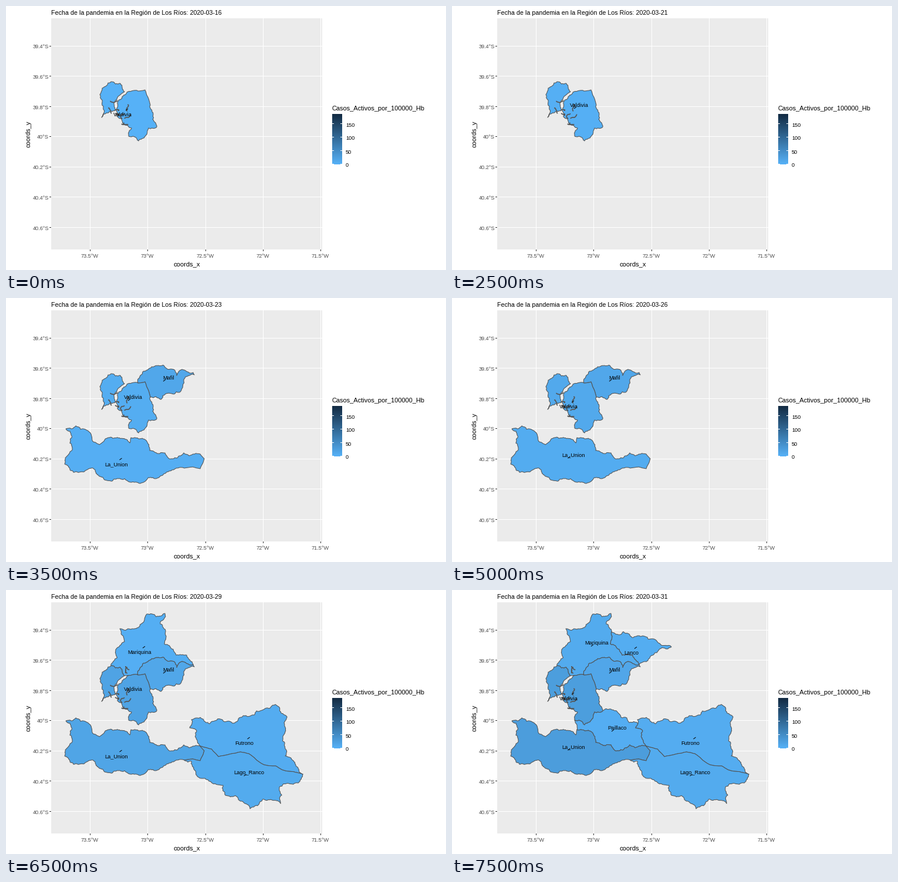
Write a matplotlib script that moves like this. It is 750 by 450 pixels and loops after 8000 ms.

```python
import math
import random

import matplotlib.pyplot as plt
import numpy as np
from matplotlib.animation import FuncAnimation
from matplotlib.patches import Polygon, Rectangle

W, H, DPI = 750, 450, 100
PT = 72 / DPI
DAYS, STEP = 16, 500
LOW, HIGH = np.array([86, 177, 247]) / 255, np.array([19, 43, 67]) / 255
PANEL, LINE, MAXV = "#EBEBEB", "#505050", 190

plt.rcParams["font.family"] = "Liberation Sans"
fig = plt.figure(figsize=(W / DPI, H / DPI), dpi=DPI, facecolor="white")
ax = fig.add_axes([0, 0, 1, 1])
ax.axis("off")


def text(x, y, s, size, color="black", ha="left", va="baseline", **kw):
    return ax.text(x, y, s, fontsize=size * PT, color=color, ha=ha, va=va, **kw)


def stroke(xs, ys, color, width=1, **kw):
    return ax.plot(xs, ys, color=color, lw=width * PT, snap=False,
                   solid_capstyle="butt", **kw)[0]


def shade(value):
    return LOW + (HIGH - LOW) * value / MAXV


def split(a, b, rng, amp):
    """Midpoint displacement from a up to, but without, b."""
    dx, dy = b[0] - a[0], b[1] - a[1]
    if math.hypot(dx, dy) < 3:
        return [a]
    d = rng.uniform(-amp, amp)
    mid = ((a[0] + b[0]) / 2 - dy * d, (a[1] + b[1]) / 2 + dx * d)
    return split(a, mid, rng, amp) + split(mid, b, rng, amp)


def ring(*arcs):
    """Rough outline; a border looks the same from both of its sides."""
    out = []
    for arc in arcs:
        amp = 0.04 if arc in smooth or arc[::-1] in smooth else 0.2
        for p, q in zip(arc, arc[1:]):
            a, b = sorted((p, q))
            rng = random.Random(a[0] * 7919 + a[1] * 104729 + b[0] * 31 + b[1])
            edge = split(a, b, rng, amp) + [b]
            out += (edge if a == p else edge[::-1])[:-1]
    return out


def back(arc):
    return arc[::-1]


# Key points of each border, in pixels
west_north = [(179, 129), (195, 132), (202, 146)]
west_rest = [(202, 146), (190, 156), (186, 178), (163, 190), (166, 171),
             (160, 151), (164, 140), (171, 136), (179, 129)]
east_north = [(208, 146), (225, 145)]
val_maf = [(225, 145), (237, 143), (246, 169)]
val_east = [(246, 169), (250, 193), (257, 206)]
val_south = [(257, 206), (243, 208), (226, 230)]
val_west = [(226, 230), (209, 222), (214, 208), (190, 189), (190, 163),
            (208, 146)]
maf_north = [(225, 145), (229, 132), (252, 117), (282, 121), (291, 132),
             (297, 123), (319, 127)]
maf_south = [(319, 127), (321, 131), (303, 139), (297, 160), (273, 163),
             (264, 173), (246, 169)]
mar_coast = [(179, 129), (190, 98), (202, 88), (194, 66), (213, 67),
             (236, 51), (240, 41), (271, 40), (263, 58), (272, 71)]
mar_east = [(272, 71), (270, 92), (285, 101), (290, 111), (308, 111),
            (319, 127)]
lan_north = [(272, 71), (287, 76), (292, 71), (307, 81), (335, 84), (374, 97),
             (345, 108), (337, 116), (319, 127)]
uni_north = [(102, 223), (119, 218), (137, 225), (147, 243), (159, 250),
             (174, 238), (205, 241), (211, 247), (213, 238)]
uni_pai = [(213, 238), (238, 242), (245, 260), (271, 264), (277, 273),
           (303, 264), (312, 269), (331, 266)]
uni_east = [(331, 266), (338, 274), (331, 291)]
uni_tail = [(331, 291), (318, 288), (304, 290)]
uni_south = [(304, 290), (283, 293), (258, 307), (243, 306), (212, 314),
             (168, 310), (152, 293), (122, 297), (100, 283), (112, 260),
             (112, 235), (102, 223)]
pai_north = [(257, 206), (282, 208), (288, 217), (298, 218), (302, 226),
             (317, 228)]
fut_west = [(317, 228), (313, 235), (325, 240), (331, 266)]
fut_north = [(317, 228), (316, 221), (336, 220), (347, 228), (386, 227),
             (400, 217), (423, 213), (427, 206), (459, 195), (469, 210),
             (479, 216), (475, 262), (476, 283), (490, 291), (506, 314)]
lake = [(331, 266), (350, 271), (362, 284), (400, 276), (414, 279),
        (440, 298), (460, 300), (472, 307), (506, 314)]
ran_south = [(506, 314), (498, 329), (466, 336), (468, 364), (437, 357),
             (416, 373), (404, 361), (374, 350), (370, 333), (328, 319),
             (316, 292), (304, 290)]
smooth = [val_maf, uni_east, uni_tail, lake]

shapes = {
    "Mariquina": [ring(mar_coast, mar_east, back(maf_north), back(east_north),
                       back(west_north))],
    "Lanco": [ring(lan_north, back(mar_east))],
    "Mafil": [ring(maf_north, maf_south, back(val_maf))],
    "Valdivia": [ring(west_north, west_rest),
                 ring(east_north, val_maf, val_east, val_south, val_west)],
    "Paillaco": [ring(pai_north, fut_west, back(uni_pai),
                      [(213, 238), (209, 222), (226, 230)], back(val_south))],
    "La_Union": [ring(uni_north, uni_pai, uni_east, uni_tail, uni_south)],
    "Futrono": [ring(fut_north, back(lake), back(fut_west))],
    "Lago_Ranco": [ring(lake, ran_south, back(uni_tail), back(uni_east))],
}

# First day, cases on first and last day, label point, days with label below
towns = {
    "Mariquina": (12, 4, 9, (237, 96), (13, 14)),
    "Lanco": (14, 6, 6, (315, 97), (14, 15)),
    "Mafil": (6, 14, 15, (268, 142), (6, 8, 11)),
    "Valdivia": (0, 0, 27, (208, 175), (0, 2, 3, 10, 15)),
    "Paillaco": (14, 5, 5, (272, 241), ()),
    "La_Union": (7, 4, 28, (197.5, 273), range(7, 14, 2)),
    "Futrono": (11, 7, 7, (415.5, 251), range(12, 16)),
    "Lago_Ranco": (11, 9, 9, (405.5, 317), (14,)),
}


def creeks(seed, n, x0, x1, y0, y1):
    """Short wandering waterways that start inside a box."""
    rng = random.Random(seed)
    for _ in range(n):
        x, y = rng.uniform(x0, x1), rng.uniform(y0, y1)
        turn, path = rng.uniform(0, math.tau), [(x, y)]
        for _ in range(6):
            turn += rng.uniform(-0.9, 0.9)
            x += 2.4 * math.cos(turn)
            y += 2.4 * math.sin(turn)
            path.append((min(max(x, x0), x1), min(max(y, y0), y1)))
        yield path


waters = {"Valdivia": list(creeks(5, 4, 175, 192, 154, 186))
          + list(creeks(8, 5, 192, 214, 168, 202)),
          "Mariquina": list(creeks(3, 3, 204, 216, 119, 142))}

# Panel, grid and axes
ax.add_patch(Rectangle((77, 21), 462, 394, fc=PANEL, ec="none", zorder=0))
for i in range(5):
    x = round(143 + 98.35 * i) + 0.5
    stroke([x, x], [21, 415], "white", zorder=1)
    stroke([x, x], [415, 418], "#333333")
    text(x - 0.5, 429, f"{73.5 - 0.5 * i:g}°W", 9.2, "#4D4D4D", "center")
for i in range(7):
    y = round(68 + 51.45 * i) + 0.5
    stroke([77, 539], [y, y], "white", zorder=1)
    stroke([74, 77], [y, y], "#333333")
    text(73, y + 4, f"{39.4 + 0.2 * i:.3g}°S", 9.2, "#4D4D4D", "right")
text(308, 443, "coords_x", 11.1, ha="center")
text(39, 218, "coords_y", 11.1, ha="center", va="center", rotation=90)

# Colour legend
text(556, 178, "Casos_Activos_por_100000_Hb", 10.95)
ramp = np.array([shade(MAXV * (1 - t)) for t in np.linspace(0, 1, 86)])
ax.imshow(ramp[:, None, :], extent=(556, 573, 270, 184), aspect="auto",
          interpolation="nearest", zorder=2)
ax.set(xlim=(0, W), ylim=(H, 0))
for v in (0, 50, 100, 150):
    y = round(270 - v * 0.46) - 0.5
    for x in (556, 570):
        stroke([x, x + 3], [y, y], "white", zorder=3)
    text(579, y + 5, str(v), 9.2)

title = text(77, 15, "", 10.68)

# Every district: fills, waterways, label and pointer
parts = {}
for name, rings in shapes.items():
    fills = [ax.add_patch(Polygon(r, closed=True, ec=LINE, lw=PT,
                                  joinstyle="round", zorder=4))
             for r in rings]
    lines = [stroke(*zip(*path), "#555555", 1.7, zorder=5)
             for path in waters.get(name, [])]
    label = text(0, 0, name, 9.2, ha="center", zorder=8)
    pointer = stroke([0, 0], [0, 0], "black", zorder=7)
    parts[name] = fills, lines, label, pointer


def update(day):
    title.set_text("Fecha de la pandemia en la Región de Los Ríos: "
                   f"2020-03-{16 + day}")
    for name, (fills, lines, label, pointer) in parts.items():
        first, v0, v1, (x, y), below = towns[name]
        for artist in (*fills, *lines, label, pointer):
            artist.set_visible(day >= first)
        t = max(0, day - first) / (DAYS - 1 - first)
        for fill in fills:
            fill.set_facecolor(shade(v0 + (v1 - v0) * t ** 2))
        side = -1 if day in below else 1
        label.set_position((x + 9.2 * side, y + 5 - 8 * side))
        pointer.set_data([x, x + 4 * side], [y, y - 3 * side])
    return []


anim = FuncAnimation(fig, update, frames=DAYS, interval=STEP, repeat=True)
plt.show()
```
